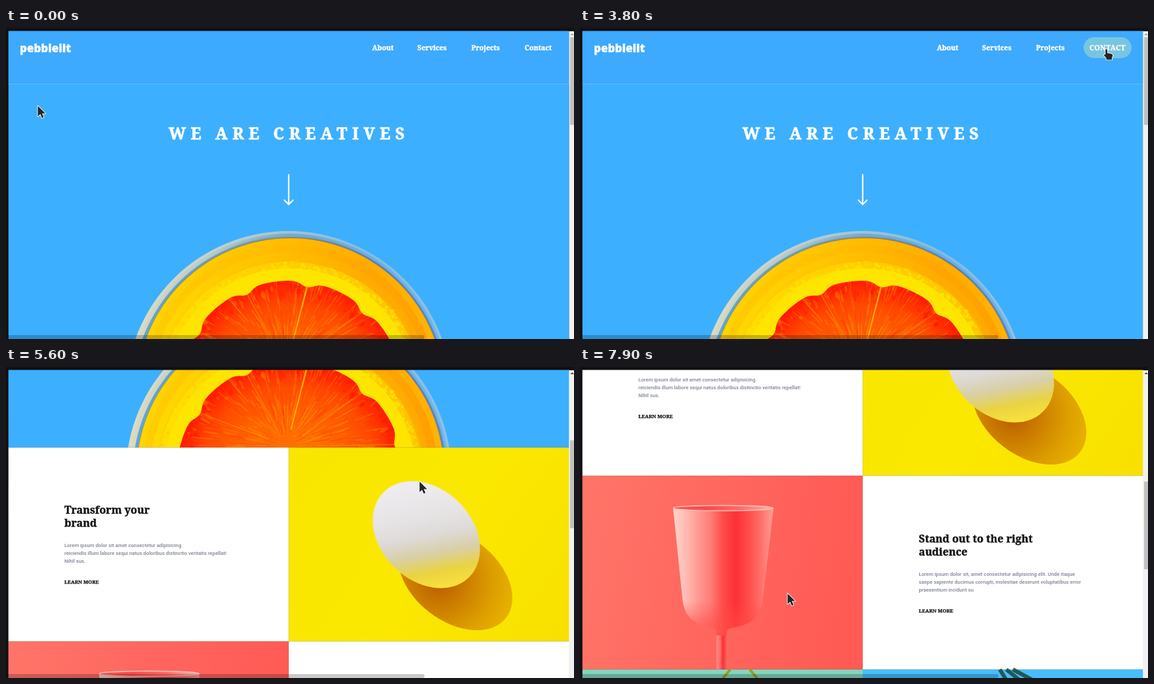
An HTML page with a canvas that plays this animation: 866x475 px, repeating every 8 s.

```html
<!DOCTYPE html>
<html lang="en">
<head>
<meta charset="utf-8">
<title>Landing page</title>
<style>
html, body { margin: 0; width: 100%; height: 100%; overflow: hidden; background: #111; }
canvas { display: block; width: 866px; height: 475px; }
</style>
</head>
<body>
<canvas id="stage" width="866" height="475"></canvas>
<script>
const ctx = document.getElementById('stage').getContext('2d');
const LOOP = 8000, TICK = 100, TAU = Math.PI * 2;
const SERIF = '"Noto Serif", serif', INK = '#131313', GREY = '#7f8296';
const LEFT = 3.5, MID = 431, RIGHT = 858.5;
const HERO_END = 518, ROW_H = 296, ROW2 = HERO_END + ROW_H, ROW3 = ROW2 + ROW_H;

// Cursor moves: start, end, x, y
const START = [48, 119];
const MOVES = [
  [100, 1000, 274, 24], [1000, 1900, 572, 35], [1900, 2400, 641, 32],
  [3600, 3800, 802, 32], [3800, 4100, 693, 149], [4500, 5100, 694, 154],
  [5500, 6100, 310, 279], [6100, 6200, 224, 287], [6200, 6600, 129, 289],
  [6900, 7000, 156, 292], [7400, 7500, 161, 292], [7800, 7900, 316, 346]
];

// Wheel notches: start, duration
const NOTCH = 144;
const WHEEL = [[4361, 360], [4765, 360], [5360, 360], [7200, 360], [7800, 200]];

const progress = (t, start, length) => Math.min(1, Math.max(0, (t - start) / length));
const ease = k => k * k * (3 - 2 * k);

function cursorAt(t) {
  return MOVES.reduce(([px, py], [a, b, x, y]) => {
    const k = progress(t, a, b - a);
    return [px + (x - px) * k, py + (y - py) * k];
  }, START).map(Math.round);
}

function scrollAt(t) {
  return Math.round(WHEEL.reduce((sum, [a, d]) => sum + NOTCH * ease(progress(t, a, d)), 0));
}

function seeded(seed) {
  return () => (seed = (seed * 16807) % 2147483647) / 2147483647;
}

// Evenly spaced colours
function spread(g, colors) {
  colors.forEach((c, i) => g.addColorStop(i / (colors.length - 1), c));
  return g;
}
const linear = (x0, y0, x1, y1, ...colors) => spread(ctx.createLinearGradient(x0, y0, x1, y1), colors);
const across = (x0, x1, ...colors) => linear(x0, 0, x1, 0, ...colors);
const radial = (x, y, r0, r1, ...colors) => spread(ctx.createRadialGradient(x, y, r0, x, y, r1), colors);

function box(x, y, w, h, fill) {
  ctx.fillStyle = fill;
  ctx.fillRect(x, y, w, h);
}

function oval(x, y, rx, ry, angle, fill) {
  ctx.beginPath();
  ctx.ellipse(x, y, rx, ry, angle, 0, TAU);
  ctx.fillStyle = fill;
  ctx.fill();
}

const disc = (x, y, r, fill) => oval(x, y, r, r, 0, fill);

function ring(x, y, r, width, stroke) {
  ctx.beginPath();
  ctx.arc(x, y, r, 0, TAU);
  ctx.strokeStyle = stroke;
  ctx.lineWidth = width;
  ctx.stroke();
}

function line(x0, y0, x1, y1, color, width) {
  ctx.beginPath();
  ctx.moveTo(x0, y0);
  ctx.lineTo(x1, y1);
  ctx.strokeStyle = color;
  ctx.lineWidth = width;
  ctx.stroke();
}

// Radial stroke around a centre
function spoke(x, y, angle, r0, r1, color, width) {
  const c = Math.cos(angle), s = Math.sin(angle);
  line(x + r0 * c, y + r0 * s, x + r1 * c, y + r1 * s, color, width);
}

function text(str, x, y, font, color, { spacing = 0, align = 'left', heavy = 0 } = {}) {
  ctx.font = font;
  ctx.letterSpacing = spacing + 'px';
  ctx.textAlign = align;
  ctx.fillStyle = color;
  ctx.fillText(str, x, y);
  if (heavy) {
    ctx.strokeStyle = color;
    ctx.lineWidth = heavy;
    ctx.strokeText(str, x, y);
  }
  ctx.letterSpacing = '0px';
}

// Labels with their right edges
const NAV = [['About', 591], ['Services', 672], ['Projects', 753], ['Contact', 832]];
const NAV_FONT = '700 10.6px ' + SERIF, NAV_PAD = 9;

function widthOf(str, font) {
  ctx.font = font;
  return ctx.measureText(str).width;
}

function hoveredNav(x, y, scroll) {
  if (scroll || y < 14 || y > 46) return -1;
  return NAV.findIndex(([label, right]) =>
    x <= right + NAV_PAD && x >= right - widthOf(label, NAV_FONT) - NAV_PAD);
}

function drawNav(hover) {
  let shift = 0;
  for (let i = NAV.length - 1; i >= 0; i--) {
    const [label, right] = NAV[i];
    if (i === hover) {
      const caps = label.toUpperCase(), spacing = 0.5;
      const width = widthOf(caps, NAV_FONT) + caps.length * spacing;
      ctx.beginPath();
      ctx.roundRect(right - width - NAV_PAD, 14, width + 2 * NAV_PAD, 32, 16);
      ctx.fillStyle = '#77c5e0';
      ctx.fill();
      text(caps, right - width, 34, NAV_FONT, '#fff', { spacing, heavy: 0.3 });
      shift = width - widthOf(label, NAV_FONT);
    } else {
      text(label, right - shift, 34, NAV_FONT, '#fff', { align: 'right', heavy: 0.4 });
    }
  }
}

function drawFlesh(cx, cy, R) {
  const rand = seeded(77), segments = 11, top = -1.41;
  const coreX = 428, coreY = 516;
  ctx.save();
  ctx.beginPath();
  for (let a = 0; a < TAU; a += 0.02) {
    const notch = Math.abs(Math.cos((a - top) * segments / 2)) ** 10;
    const r = R * (1 - 0.045 * notch);
    ctx.lineTo(cx + r * Math.cos(a), cy + r * Math.sin(a));
  }
  ctx.closePath();
  ctx.fillStyle = radial(cx, cy, 20, R, '#ff7600', '#ff6c00', '#ff6000', '#ff4a00', '#ff1c00');
  ctx.fill();
  ctx.clip();

  for (let i = 0; i < 150; i++) {
    const a = -Math.PI * rand(), r = R - 22 * rand() ** 1.4;
    oval(cx + r * Math.cos(a), cy + r * Math.sin(a), 2 + 7 * rand(), 1 + 2.5 * rand(), a,
      rand() < 0.75 ? 'rgba(255,20,0,.4)' : 'rgba(255,120,0,.5)');
  }
  for (let i = 0; i < 380; i++) {
    const a = -Math.PI * (1.05 * rand() - 0.02), r = 15 + 120 * rand();
    const color = rand() < 0.5 ? 'rgba(255,165,0,.3)' : 'rgba(255,45,0,.25)';
    spoke(coreX, coreY, a, r, r + 8 + 26 * rand(), color, 0.7 + 1.6 * rand());
  }
  for (let i = 0; i < segments; i++) {
    const a = top + i * TAU / segments;
    const x = cx + R * Math.cos(a), y = cy + R * Math.sin(a);
    line(x, y, x + (coreX - x) * 0.8, y + (coreY - y) * 0.8,
      i ? 'rgba(255,165,0,.5)' : '#ffb000', i ? 1.3 : 2.2);
  }
  ctx.restore();
}

function drawOrange() {
  const L = 185, R = 677;
  disc(431, 558, 248, across(L, R, '#dfdcc0', '#c3d3cb', '#a0c5d0', '#7fbde2', '#90c3df'));
  disc(431.5, 558, 244, across(L, R, '#dcdabd', '#b5ccc8', '#78aace', '#68aee6', '#6db7f0'));
  disc(432.5, 557, 239, across(L, R, '#5ba8e0', '#6c9cc6', '#7f9cb4', '#4d83cf', '#5c8dcc'));
  disc(433.5, 555, 235, across(L, R, '#a29a58', '#7d783f', '#6e7691'));
  disc(433.5, 555, 234, across(200, 668, '#ffd600', '#ffca00', '#ffbc00', '#ffac00', '#ffb400'));
  ring(433, 556, 219, 12, across(210, 655, 'rgba(255,190,0,.3)', 'rgba(255,165,0,.15)', 'rgba(255,135,0,.45)'));
  ring(433, 557, 209, 10, across(220, 645, 'rgba(255,225,0,.5)', 'rgba(255,190,0,.3)', 'rgba(255,150,0,.3)'));

  const cx = 433, cy = 559, rand = seeded(19);
  disc(cx, cy, 202, across(230, 637, '#ffe000', '#ffcc00', '#ffc400'));
  for (let i = 0; i < 260; i++) {
    const a = -Math.PI * rand(), r = 190 + 11 * rand();
    disc(cx + r * Math.cos(a), cy + r * Math.sin(a), 1 + 2 * rand(), rand() < 0.7 ? '#ffde00' : '#ffcf00');
  }
  disc(cx, cy, 192, '#fde500');
  drawFlesh(cx, cy, 173);
}

function drawHero(hover) {
  const width = RIGHT - LEFT;
  box(LEFT, 0, width, HERO_END, '#3dafff');
  box(LEFT, 0, width, 85, '#3da9ff');
  box(LEFT, 85, width, 1, '#5cbcff');
  text('pebblelit', 21, 37, '800 17px "Open Sans", sans-serif', '#fff', { heavy: 0.3 });
  drawNav(hover);
  text('WE ARE CREATIVES', 248, 169.5, '700 24.5px ' + SERIF, '#fff', { spacing: 7.55, heavy: 0.8 });

  ctx.lineCap = ctx.lineJoin = 'round';
  line(431, 224, 431, 269, '#fff', 2.2);
  ctx.beginPath();
  ctx.moveTo(424.5, 263);
  ctx.lineTo(431, 269.5);
  ctx.lineTo(437.5, 263);
  ctx.stroke();
  ctx.lineCap = 'butt';

  ctx.save();
  ctx.beginPath();
  ctx.rect(LEFT, 0, width, HERO_END);
  ctx.clip();
  drawOrange();
  ctx.restore();
}

function drawEgg() {
  box(MID, HERO_END, RIGHT - MID, ROW_H, linear(MID, HERO_END, RIGHT, ROW2, '#f9e600', '#fbe800', '#f8e000'));
  oval(685, 718, 98, 65, 0.66, radial(660, 722, 10, 118, '#bd6400', '#ce8100', '#dc9d00', '#e8b200'));
  oval(641, 651, 92, 70, Math.PI / 4,
    linear(626, 570, 658, 735, '#eeecef', '#eae8ea', '#e6e3e4', '#dedad8', '#d8cfa8', '#ead342', '#fae23a'));
}

function drawCup() {
  const top = 864, wall = 1001, foot = 1047;
  box(LEFT, ROW2, MID - LEFT, ROW_H, linear(LEFT, ROW2 + 60, MID, ROW2 + 130, '#ff7468', '#ff665e', '#ff5a54'));
  box(208, foot, 15, ROW3 - foot, across(208, 223, '#ff8b84', '#ff716b', '#fb3038', '#ff5954'));
  ctx.beginPath();
  ctx.moveTo(142, top);
  ctx.lineTo(156, wall);
  ctx.bezierCurveTo(159, 1030, 172, 1040, 205, foot);
  ctx.quadraticCurveTo(208, 1050, 208, 1058);
  ctx.lineTo(223, 1058);
  ctx.quadraticCurveTo(223, 1049, 228, foot);
  ctx.bezierCurveTo(261, 1042, 276, 1031, 279, wall);
  ctx.lineTo(295, top);
  ctx.closePath();
  ctx.fillStyle = across(142, 295, '#ffd5cb', '#ffbbb2', '#ff9a93', '#ff7c76', '#ff4a49', '#fb3036', '#ff4c4a', '#ff706a', '#ffa097');
  ctx.fill();
  ctx.fillStyle = linear(0, 1005, 0, foot, 'rgba(255,75,70,0)', 'rgba(255,75,70,.65)');
  ctx.fill();
  oval(218.5, top - 0.5, 76, 4, 0, across(142, 295, '#fb5a55', '#f94949', '#ff6a64', '#ffb3aa'));
  ctx.strokeStyle = '#ffc4ba';
  ctx.lineWidth = 1.4;
  ctx.stroke();
}

function drawFruitRow() {
  box(LEFT, ROW3, MID - LEFT, 200, '#82d6bd');
  box(MID, ROW3, RIGHT - MID, 200, '#48bdfc');
  [-1, 1].forEach(side => line(244 + side * 15, ROW3, 244 + side * 28, ROW3 + 16, '#9a9f1c', 4));
  [0, 1, 2].forEach(i => line(640 + i * 10, ROW3, 650 + i * 20, ROW3 + 16, '#1f5a55', 6));
}

function drawCopy(x, y, title, body, linkColor) {
  title.forEach((s, i) => text(s, x, y + i * 20, '700 16.1px ' + SERIF, INK, { heavy: 0.4 }));
  body.forEach((s, i) => text(s, x, y + 51 + i * 12, '500 7.76px Roboto, sans-serif', GREY));
  text('LEARN MORE', x, y + 107, '700 7.6px ' + SERIF, linkColor, { heavy: 0.25 });
}

function drawRows(linkHover) {
  box(LEFT, HERO_END, MID - LEFT, ROW_H, '#fff');
  box(MID, ROW2, RIGHT - MID, ROW_H, '#fff');
  drawEgg();
  drawCup();
  drawCopy(89, 619, ['Transform your', 'brand'],
    ['Lorem ipsum dolor sit amet consectetur adipisicing',
      'reiciendis illum labore sequi natus doloribus distinctio veritatis repellat!',
      'Nihil sus.'], linkHover ? GREY : INK);
  drawCopy(516.5, 916, ['Stand out to the right', 'audience'],
    ['Lorem ipsum dolor sit, amet consectetur adipisicing elit. Unde itaque',
      'saepe sapiente ducimus corrupti, molestiae deserunt voluptatibus error',
      'praesentium incidunt su'], INK);
  drawFruitRow();
  [HERO_END, ROW2, ROW3].forEach(y => line(LEFT, y, RIGHT, y, 'rgba(110,120,90,.4)', 0.8));
  line(MID, HERO_END, MID, ROW3, 'rgba(110,110,90,.3)', 0.8);
}

const ARROW = new Path2D('M0 0V16.2L3.8 12.6 6.4 18.4 9 17.2 6.5 11.6H11.6Z');
const HAND = new Path2D('M-1.4 1.2Q0-.8 1.4 1.2V6.2L6 7 8.6 8Q9.8 8.4 9.6 10.5L8.4 14V16.4H0V14.2L-4 9.2Q-2.6 7.6-1.4 9Z');

function drawCursor(x, y, hand) {
  const shape = hand ? HAND : ARROW;
  ctx.save();
  ctx.translate(x + 0.5, y);
  ctx.lineJoin = 'round';
  ctx.strokeStyle = '#fff';
  ctx.lineWidth = 1.8;
  ctx.stroke(shape);
  ctx.fillStyle = '#262626';
  ctx.fill(shape);
  ctx.restore();
}

function drawFrame(scroll) {
  ctx.beginPath();
  ctx.roundRect(-6, 469, 644, 6, 3);
  ctx.fillStyle = 'rgba(0,0,0,.21)';
  ctx.fill();
  box(RIGHT, 5, 8, 470, '#f1f1f1');
  box(860, 14 + scroll * 0.2485, 6, 134, '#c1c1c1');
  ctx.beginPath();
  ctx.moveTo(860.5, 11);
  ctx.lineTo(863.3, 8);
  ctx.lineTo(866, 11);
  ctx.fillStyle = scroll ? '#505050' : '#a3a3a3';
  ctx.fill();
  box(0, 0, 866, 4.5, '#120f12');
  box(0, 0, LEFT, 475, '#120f12');
}

function draw(t) {
  const scroll = scrollAt(t);
  const [x, y] = cursorAt(t);
  const nav = hoveredNav(x, y, scroll);
  const link = x >= 89 && x <= 141 && Math.abs(y + scroll - 722) < 8;
  ctx.save();
  ctx.translate(0, -scroll);
  drawHero(nav);
  drawRows(link);
  ctx.restore();
  drawFrame(scroll);
  drawCursor(x, y, nav >= 0 || link);
}

let shown = -1;
function frame() {
  const t = Math.floor(performance.now() % LOOP / TICK) * TICK;
  if (t !== shown) draw(shown = t);
  requestAnimationFrame(frame);
}
frame();
</script>
</body>
</html>
```
